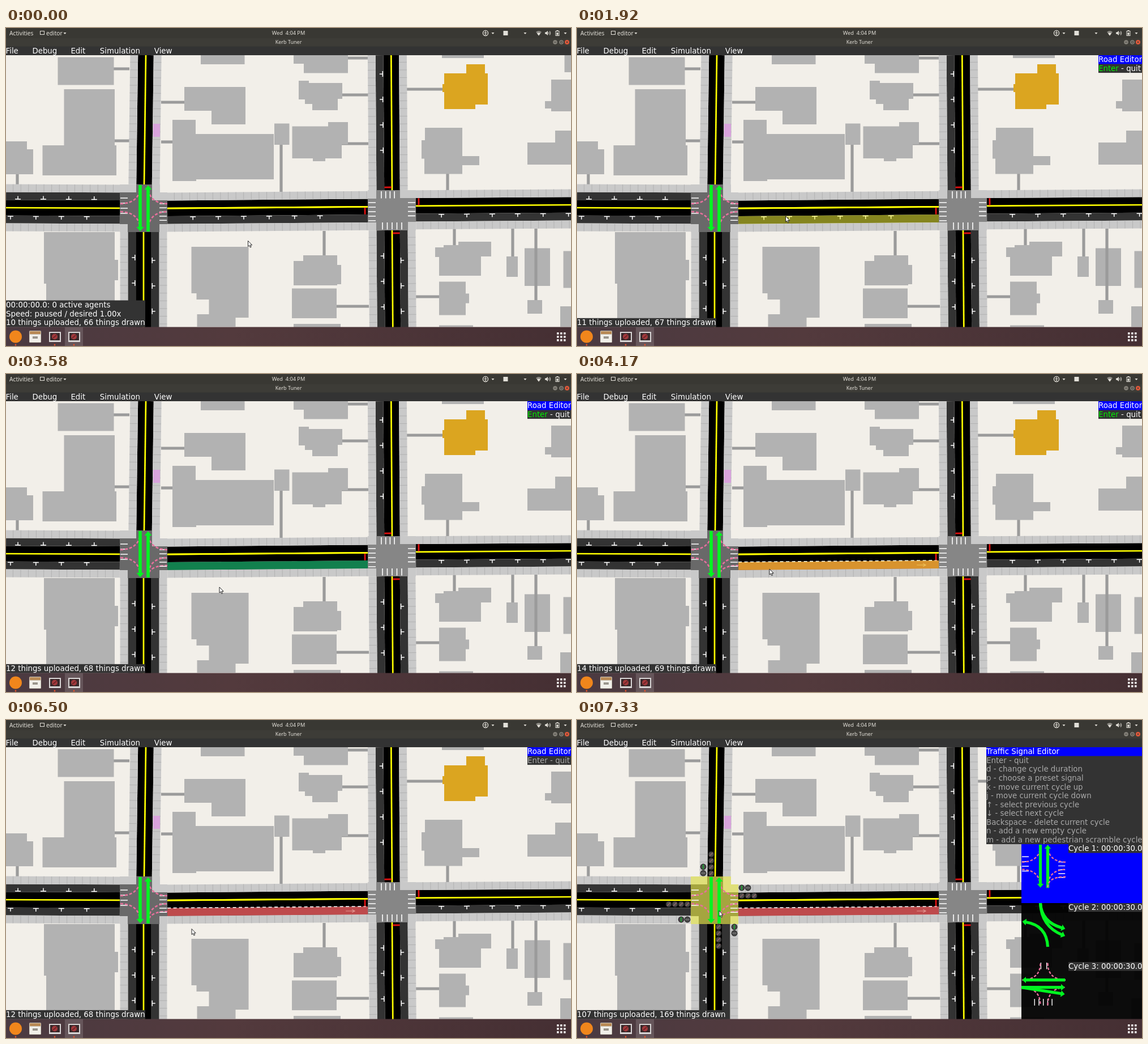
These frames come from a looping animation (998x561 px, 8000 ms). An HTML page:

```html
<!DOCTYPE html>
<html lang="en">
<head>
<meta charset="utf-8">
<title>Road editor</title>
<style>
  html, body { margin: 0; width: 100%; height: 100%; overflow: hidden; background: #f2efe9; }
  svg { display: block; }
  text { font: 13.35px "DejaVu Sans", sans-serif; fill: #fff; white-space: pre; }
  .dim { fill: #a9a9a9; }
  .shell { font-family: "Noto Sans", "Open Sans", sans-serif; fill: #e2dfd8; }
</style>
</head>
<body>
<svg id="stage" width="998" height="561" viewBox="0 0 998 561"></svg>
<script>
const LOOP = 8000, STEP = 1000 / 12;
const LANE = 13.8, ROW = 15.55;
const WALK = '#c9c9c9', GREEN = '#00f520', PINK = '#e8709c';

// ---- helpers ----
const range = (n, f) => Array.from({ length: n }, (_, i) => f(i)).join('');
const rect = (x, y, w, h, fill, more = '') =>
  `<rect x="${x}" y="${y}" width="${w}" height="${h}" fill="${fill}" ${more}/>`;
const line = (d, stroke, w, more = '') =>
  `<path d="${d}" fill="none" stroke="${stroke}" stroke-width="${w}" ${more}/>`;
const fillPath = (d, fill, more = '') => `<path d="${d}" fill="${fill}" ${more}/>`;
const dot = (x, y, r, fill, more = '') => `<circle cx="${x}" cy="${y}" r="${r}" fill="${fill}" ${more}/>`;
const text = (x, y, s, more = '') => `<text x="${x}" y="${y}" ${more}>${s}</text>`;
const shell = (x, y, s, size, more = '') =>
  text(x, y, s, `class="shell" style="font-size:${size}px" ${more}`);
const group = (id, body) => `<g id="${id}">${body}</g>`;

// outline that turns at right angles: steps run across, down, across, down ...
const outline = (x, y, ...steps) =>
  `M${x},${y}` + steps.map((v, i) => 'hv'[i % 2] + v).join('') + `H${x}z`;

// ---- city blocks: a house may have a drive running to one side of its block ----
function cityBlock(w, n, e, s) {
  const end = { n: `V${n}`, s: `V${s}`, w: `H${w}`, e: `H${e}` };
  return (drive, ...shape) => {
    const [x, y] = shape, side = drive[0], at = drive.slice(1);
    const start = 'ns'.includes(side) ? `${at},${y + 4}` : `${x + 4},${at}`;
    return (side ? line(`M${start}${end[side]}`, '#9b9b9b', 5.2) : '') +
      fillPath(outline(...shape), '#b2b2b2');
  };
}
const northWest = cityBlock(0, 48, 218, 277), north = cityBlock(274, 48, 640, 289);
const northEast = cityBlock(708, 48, 998, 287), southWest = cityBlock(0, 360, 202, 527);
const south = cityBlock(285, 358, 641, 527), southEast = cityBlock(724, 354, 998, 527);

const houses =
  northWest('e72', 91.5, 51.5, 99, 49) +
  northWest('e199', 102.5, 108, 89.5, 99, 3, 53, -130.5, -53) +
  northWest('s20', 0, 200, 37, 14, 11, 44) +
  north('', 344, 47, 77.5, 17) +
  north('w131', 315, 104, 108, 66, -60, -24) +
  north('w201', 294, 162, 41, 25, 138, 80, -137, 3) +
  north('s486', 474, 168.5, 26.5, 37.5) +
  north('e204', 505.5, 173.5, 63.5, -7.5, 35, 39, -11, 25, -29, 5, -22, -5) +
  north('e118', 517, 93, 18, 4, 59, 28, -8, 20, -45, -11, -13, -8) +
  north('e53', 508, 48, 96, 31.5, -78, -16.5) +
  northEast('', 770, 48, 74, 5) +
  northEast('', 986.5, 48, 12, 30) +
  northEast('', 952, 129, 11, -38, 35, 56, -35, -5) +
  northEast('s780', 734, 198, 6, -22, 66, 50, 30, 16, -30, 15.5, -67, -27) +
  northEast('', 921, 202, 49, -21, 28, 60) +
  southWest('n130', 67, 360, 125, 49, 6, 36, -6, 82, -121, -76) +
  south('', 327.5, 386, 101, 125, -23, 16, -68, -22, 21, -26, -22, -11) +
  south('n562', 508, 411, 17, -10, 60, 17, 7, 34, -7, 2) +
  south('e491', 505, 459.5, 79, 52.5) +
  south('', 508, 522, 83, 6) +
  southEast('n792', 758, 387, 15, -4, 26, -6, 58, 26, -18, 34, -74, -33) +
  southEast('n895', 884, 403, 20, 36) +
  southEast('', 916, 388.5, 45, 66.5) +
  southEast('n936', 921, 480, 26, 24) +
  southEast('', 984.5, 393.5, 14, 65) +
  southEast('w474', 765, 447.5, 47, 21, 6, 17, -6, 21) +
  southEast('', 765, 524.5, 60, 3) +
  southEast('', 979, 491, 19, 36) +
  line('M708,108h70', '#9b9b9b', 5.2) +
  fillPath(outline(771, 99, 3, -19, 39, -16, 33, 16, 5, 55, -22, 8, -55, -30), '#dba520');

// ---- roads: lanes are listed from the centre line outwards ----
const LANE_FILL = { d: '#000', p: '#333', s: WALK };

function placeAlong([x1, y1, x2, y2]) {
  const angle = Math.atan2(y2 - y1, x2 - x1) * 180 / Math.PI;
  return `transform="translate(${x1} ${y1}) rotate(${angle})"`;
}

function stallMarks(side, start, len) {
  let d = '';
  for (let x = start; x <= len - 45; x += 44.9)
    d += `M${x - 5},${side * 15.2}h10M${x},${side * 15.2}v${side * 5.5}`;
  return line(d, '#fff', 1.5);
}

function road(ends, left, right, leftStall = 45, rightStall = 45, extra = '') {
  const len = Math.hypot(ends[2] - ends[0], ends[3] - ends[1]);
  let out = '';
  for (const [side, lanes, stall] of [[-1, left, leftStall], [1, right, rightStall]]) {
    [...lanes].forEach((kind, i) => {
      out += rect(0, side > 0 ? i * LANE : -(i + 1) * LANE, len, LANE, LANE_FILL[kind]);
      if (kind === 's')
        out += line(`M12,${side * (i + .5) * LANE}H${len}`, '#b2b2b2', LANE, 'stroke-dasharray="1 12.6"');
    });
    if (lanes.includes('p')) out += stallMarks(side, stall, len);
  }
  return `<g ${placeAlong(ends)}>${out}${line(`M0,0H${len}`, '#ff0', 2.7)}${extra}</g>`;
}
const stopBar = (x, y) => line(`M${x},${y}v12.5`, '#e01010', 2.8);

const mainRoad = [285, 318.2, 639, 315.3], mainLen = 354;
const busLane = rect(0, LANE, mainLen, LANE, '#be4a4c') +
  line(`M0,${LANE - .3}H${mainLen - 3}`, '#fff', 1.6, 'stroke-dasharray="6 4.5"') +
  line('M315,21.5h16m-5,-2.5l5,2.5l-5,2.5', '#e39a94', 1);
const hover = (id, lane) => group(id, rect(0, lane * LANE, mainLen, LANE, '#ff0', 'opacity=".4"'));

const roads =
  road([0, 317, 201, 317.8], 'dps', 'dps', 21, 8) +
  road(mainRoad, 'ds', 'dps') +
  `<g ${placeAlong(mainRoad)}>` +
    group('bike', rect(0, LANE, mainLen, LANE, '#12804e')) + group('bus', busLane) +
    stopBar(349, 1) + hover('hoverDrive', 0) + hover('hoverSide', 1) +
    line(`M0,0H${mainLen}`, '#ff0', 2.7) + '</g>' +
  road([724, 313.8, 1040, 311.7], 'ds', 'dps', 0, 45, stopBar(5, -13.5)) +
  road([247, 48, 244, 276], 'ds', 'ds') +
  road([243, 360, 243, 620], 'dps', 'dps', 50) +
  road([680.3, 48, 682, 286], 'ds', 'dps', 0, 33, stopBar(233, 1)) +
  road([682, 357, 684, 620], 'dps', 'dps', 53, 45, stopBar(5, -13.5));

// ---- junctions ----
const stripesAcross = (x, y, n, gap) => range(n, i => `M${x},${y + i * gap}h13`);
const stripesDown = (x, y, n, gap) => range(n, i => `M${x + i * gap},${y}v12.5`);

const westCorner = outline(201, 276, 71, 14, 13, 70);
const junctions =
  fillPath(westCorner, WALK) +
  fillPath(outline(201, 290, 29, -14, 28, 28, 27, 42, -14, 14, -56, -14), '#696969') +
  rect(639, 286, 85, 71, WALK) +
  fillPath(outline(639, 301, 15, -15, 42, 14, 28, 42, -14, 15, -56, -14), '#868686') +
  line(stripesAcross(640, 308, 5, 8) + stripesAcross(710, 308, 4, 7.8) +
    stripesDown(663, 288, 4, 7.7) + stripesDown(665, 343, 5, 8.5), '#fff', 1.6);

const sideStripes = stripesAcross(1, 24, 4, 9) + stripesAcross(70, 34, 5, 7.3);
const endStripes = stripesDown(37, 1, 2, 11) + stripesDown(25, 70, 5, 8.3);
const stripes = d => line(d, '#fff', 1.5);
const dashed = d => line(d, PINK, 2.5, 'stroke-dasharray="5 3"');
const arrows = (...list) => list.map(d => line(d, GREEN, 5.6, 'marker-end="url(#head)"')).join('');

const bends = dashed('M1,34Q36,33 36,2M1,48Q36,49 36,82M50,2Q50,33 84,34M50,82Q50,49 84,48');
const mergeBend = dashed('M50,82Q50,62 84,62');
const phases = [
  stripes(sideStripes) + bends + arrows('M36,1V76', 'M50,83V8'),
  arrows('M36,0Q38,36 77,47', 'M36,0Q38,44 77,60', 'M50,83Q48,42 8,36'),
  stripes(endStripes) + bends + arrows('M83,34H8', 'M0,48H76', 'M0,48L76,60'),
];

// a row of lamps beside the west junction; pairs are for people on foot
const queue = (x, y, n, down) => range(n, i => {
  const cx = down ? x : x + 11 * i, cy = down ? y + 11.2 * i : y;
  const mark = n > 2 ? line(`M${cx - 3},${cy + 3}l6,-6`, '#8f6468', 1.5)
    : i ? line(`M${cx - 4},${cy}h8`, '#777', 1.5) : line(`M${cx},${cy - 4}v8`, '#18b030', 1.6);
  return dot(cx, cy, 5.4, '#2b2b2b') + dot(cx, cy, 4, '#4c4c4c') + mark;
});
const lamps = queue(237, 237, 4, true) + queue(223, 259, 2, true) + queue(291, 296, 2) +
  queue(291, 310, 3) + queue(162, 325, 4) + queue(184, 352, 2) +
  queue(250, 365, 4, true) + queue(278, 365, 2, true);

// ---- text panels ----
const panel = (x, rows) =>
  rect(x, 48, 998 - x, rows.length * ROW, '#333') + rect(x, 48, 998 - x, ROW, '#00f') +
  rows.map((s, i) => text(x, 60.3 + i * ROW, s, i ? 'class="dim"' : '')).join('');

const signalRows = ['Traffic Signal Editor', 'Enter - quit', 'd - change cycle duration',
  'p - choose a preset signal', 'k - move current cycle up', 'j - move current cycle down',
  '↑ - select previous cycle', '↓ - select next cycle', 'Backspace - delete current cycle',
  'n - add a new empty cycle', 'm - add a new pedestrian scramble cycle'];

const signalEditor = rect(785, 219, 213, 104, '#00f') + rect(785, 323, 213, 205, '#000', 'opacity=".95"') +
  phases.map((art, i) => {
    const y = 219 + i * 104;
    return `<g transform="translate(785 ${y}) scale(.93)">${art}${i ? '' : mergeBend}</g>` +
      rect(868, y, 130, ROW, '#333') + text(868, y + 12.3, `Cycle ${i + 1}: 00:00:30.0`);
  }).join('') + panel(723, signalRows);

const roadEditor = panel(921, ['Road Editor', '']) +
  text(921, 60.3 + ROW, '<tspan id="quitKey">Enter</tspan> - quit', 'id="quit"');

const status = group('clock', rect(0, 480.5, 246, 31.5, '#333') +
    text(0, 493.2, '00:00:00.0: 0 active agents') + text(0, 508.7, 'Speed: paused / desired 1.00x')) +
  rect(0, 511.8, 246, 16, '#333', 'id="countBox"') + text(0, 524.3, '', 'id="count"');

// ---- desktop ----
const PALE = '#e2dfd8';
const caret = x => fillPath(`M${x - 2.5},8h5l-2.5,3z`, PALE);
const windowIcon = x => rect(x - 10, 536, 21, 18, '#d9d6d6') + rect(x - 8, 538, 17, 13, '#38282a') +
  dot(x, 544.5, 5, '#a2393c') + line(`M${x - 3},547l6,-5`, '#5b2023', 1.3);

const topBar =
  rect(0, 0, 998, 18, '#393833') + rect(0, 18, 998, 15, '#3d3c37') + rect(0, 32.5, 998, 15.5, '#333') +
  shell(6, 12.5, 'Activities', 10.2) +
  rect(60.5, 5.5, 7, 6, 'none', `stroke="${PALE}"`) + shell(71, 12.5, 'editor', 10.2) +
  shell(499, 12.3, 'Wed&#160; 4:04 PM', 9.2, 'text-anchor="middle" font-weight="500"') +
  shell(499, 28.4, 'Kerb Tuner', 9, 'text-anchor="middle" font-weight="700"') +
  dot(847, 9, 4.6, 'none', `stroke="${PALE}" stroke-width="1.3"`) + dot(847, 6.8, 1, PALE) +
  line('M844.3,8.7h5.4M847,8.7v2l-1.5,2M847,10.7l1.5,2', PALE, 1) +
  rect(878.5, 5, 8, 8, PALE) +
  fillPath('M941,13.5l-5,-6.5q5,-4 10,0z', '#8b8983') + fillPath('M941,13.5l-3,-4q3,-2 6,0z', PALE) +
  fillPath('M952,7.5h2l3,-2.5v8l-3,-2.5h-2z', PALE) +
  line('M958.5,7q1.5,2 0,4M960.5,5.5q2.5,3.5 0,7', PALE, 1) +
  rect(971, 5.5, 6, 8, 'none', `stroke="${PALE}"`) + rect(972.5, 4, 3, 1.5, PALE) + rect(972.5, 8, 3, 4.5, PALE) +
  [104, 860, 917, 988].map(caret).join('') +
  dot(970, 25, 3.8, '#85827a') + dot(981, 25, 3.8, '#85827a') + dot(991, 25, 4, '#e0583a') +
  line('M968,25h4M979.5,23.5h3v3h-3zM989.5,23.5l3,3m0,-3l-3,3', '#3a3934', .9) +
  text(-.5, 44.9, 'File') + text(46.4, 44.9, 'Debug') + text(114.4, 44.9, 'Edit') +
  text(165.8, 44.9, 'Simulation') + text(261.8, 44.9, 'View');

const dock =
  rect(0, 527.5, 998, 34, 'url(#dock)') + rect(104, 528, 32, 33, '#fff', 'opacity=".14"') +
  dot(17, 544.5, 11, '#f0861c') +
  rect(41, 534, 21, 21, '#cfcabf', 'rx="1.5"') + rect(42, 535, 19, 5, '#b98a55') +
  rect(42, 541, 19, 13, '#f1efe9') + rect(47, 544, 9, 4, '#9a958c') +
  windowIcon(86) + windowIcon(120) +
  [17, 86, 120].map(x => dot(x, 559, 1.4, '#e8542a')).join('') +
  range(9, i => rect(973 + i % 3 * 6, 537 + Math.floor(i / 3) * 6, 3.6, 3.6, '#f0eeee'));

const pointer = group('pointer', fillPath('M0,0V10L2.3,8L3.9,11.6L5.6,10.8L4,7.4H7.2z', '#fff',
  'stroke="#111" stroke-width=".9" stroke-linejoin="round"'));

document.getElementById('stage').innerHTML = `
  <defs>
    <marker id="head" markerUnits="userSpaceOnUse" markerWidth="16" markerHeight="16" refX="1" refY="8" orient="auto">
      <path d="M0,1.5L7.5,8L0,14.5z" fill="${GREEN}"/></marker>
    <linearGradient id="dock"><stop stop-color="#4b3a41"/><stop offset=".4" stop-color="#533a3d"/>
      <stop offset="1" stop-color="#452f33"/></linearGradient>
  </defs>` +
  rect(0, 0, 998, 561, '#f2efe9') + houses + roads +
  rect(260, 169, 12, 23, '#d8a3dc') + junctions +
  group('hoverJunction', fillPath(westCorner, '#ff0', 'opacity=".4"')) +
  `<g transform="translate(201 276)">${group('merge', mergeBend)}${phases[0]}</g>` +
  group('lamps', lamps) + status + group('roadEditor', roadEditor) + group('signalEditor', signalEditor) +
  topBar + dock + pointer;

// ---- timeline, in ms ----
const CLOCK_OFF = 575, EDIT_OPEN = 745, TO_BIKE = 2245, TO_BUS = 4165;
const QUIT = 5665, EDIT_CLOSED = 6575, SIGNALS = 7325;

// pointer moves: start, end, and the place it reaches
const moves = [
  [83, 167, 418.5, 378], [667, 1000, 388.5, 320], [1000, 1917, 368.5, 332], [2750, 3000, 377, 376],
  [3583, 3917, 340, 344], [4250, 4500, 328, 368.5], [6500, 7000, 251, 336.5],
];

const el = id => document.getElementById(id);
const show = (id, on) => { el(id).style.display = on ? '' : 'none'; };

function pointerAt(time) {
  const t = Math.floor((time + 5) / STEP) * STEP;
  let x = 427.5, y = 375.5;
  for (const [start, end, toX, toY] of moves) {
    const f = Math.min(1, Math.max(0, (t - start) / (end - start)));
    x += (toX - x) * f;
    y += (toY - y) * f;
  }
  return [x, y];
}

// what lies under the pointer: lane 0 or 1 of the main road, or the west junction
function underPointer(x, y) {
  const [x1, y1, x2, y2] = mainRoad;
  if (x < x1) return y > 276 && y < 360 ? 'junction' : '';
  const lane = Math.floor((y - y1 - (y2 - y1) * (x - x1) / mainLen) / LANE);
  return ['drive', 'side'][lane] || '';
}

function draw() {
  const t = performance.now() % LOOP;
  const [x, y] = pointerAt(t), target = underPointer(x, y);
  const edited = t >= TO_BIKE, signals = t >= SIGNALS;

  show('clock', t < CLOCK_OFF || (t >= EDIT_CLOSED && !signals));
  show('roadEditor', t >= EDIT_OPEN && t < EDIT_CLOSED);
  show('signalEditor', signals);
  show('lamps', signals);
  show('bike', edited && t < TO_BUS);
  show('bus', t >= TO_BUS);
  show('merge', edited);
  show('hoverDrive', target === 'drive');
  show('hoverSide', target === 'side');
  show('hoverJunction', target === 'junction');
  el('quit').setAttribute('class', t < QUIT ? '' : 'dim');
  el('quitKey').setAttribute('fill', t < QUIT ? '#00f000' : '#a9a9a9');

  const over = target ? 1 : 0;
  const uploaded = signals ? 107 : 10 + (edited ? 2 + 2 * over : over);
  const drawn = signals ? 169 : 66 + (edited ? 2 : 0) + over;
  el('count').textContent = `${uploaded} things uploaded, ${drawn} things drawn`;
  el('countBox').setAttribute('width', signals ? 263.5 : 246);
  el('pointer').setAttribute('transform', `translate(${x} ${y})`);
  requestAnimationFrame(draw);
}
draw();
</script>
</body>
</html>
```
